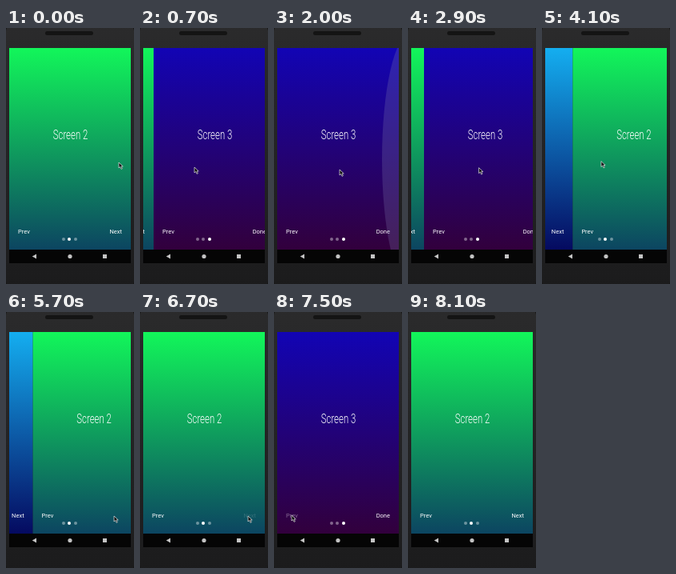
An HTML page for the animation above (8.2 s loop, 160 px wide and 320 px high).

```html
<!DOCTYPE html>
<html lang="en">
<head>
<meta charset="utf-8">
<title>Swiper</title>
<style>
html, body { margin: 0; width: 100%; height: 100%; overflow: hidden; background: #161616; }
#stage { position: relative; width: 160px; height: 320px; overflow: hidden; font: 7.5px Roboto, sans-serif; color: #fff; }
#stage svg { position: absolute; left: 0; top: 0; }
#screen { position: absolute; left: 4px; top: 25px; width: 152px; height: 252px; overflow: hidden; }
#track { display: flex; width: 456px; height: 252px; }
.page { position: relative; width: 152px; height: 252px; }
.page:nth-child(1) { background: linear-gradient(#14aef0, #050a60); }
.page:nth-child(2) { background: linear-gradient(#12f65a, #0c4561); }
.page:nth-child(3) { background: linear-gradient(#1204b4, #32003c); }
h1 { position: absolute; left: 0; top: 98px; width: 153px; margin: 0; text-align: center; font: 300 17px/21px Roboto, sans-serif; transform: scaleX(.67); }
.page span { position: absolute; top: 225px; line-height: 10px; }
.prev { left: 11px; }
.next { right: 11px; }
#dots i { position: absolute; top: 237px; width: 4px; height: 4px; border-radius: 50%; }
</style>
</head>
<body>
<div id="stage">
  <svg width="160" height="320">
    <linearGradient id="body" x2="0" y2="1"><stop stop-color="#2b2b2c"/><stop offset="1" stop-color="#1b1b1c"/></linearGradient>
    <rect x="-.5" y="-12" width="161" height="344" rx="20" fill="url(#body)"/>
    <rect x="49" y="4" width="60" height="5" rx="2.5" fill="#141414"/>
    <rect x="4" y="277" width="152" height="17" fill="#050505"/>
    <path d="M38 282.5v6l-5.3-3z" fill="#c4c4c4"/>
    <circle cx="80" cy="285.5" r="2.6" fill="#c4c4c4"/>
    <rect x="121" y="283" width="5" height="5" fill="#c4c4c4"/>
  </svg>
  <div id="screen">
    <div id="track">
      <div class="page"><h1>Screen 1</h1><span class="next">Next</span></div>
      <div class="page"><h1>Screen 2</h1><span class="prev">Prev</span><span class="next">Next</span></div>
      <div class="page"><h1>Screen 3</h1><span class="prev">Prev</span><span class="next">Done</span></div>
    </div>
    <svg width="152" height="252"><ellipse id="glow" cx="166" cy="139" ry="156" fill="#8080b0"/></svg>
    <div id="dots"><i></i><i></i><i></i></div>
  </div>
  <svg width="160" height="320">
    <path id="cursor" d="M0 0v8.2l2-1.8 1.6 3.4 1.5-.7-1.5-3.3h2.6z" fill="#111" stroke="#eee" stroke-width=".8"/>
  </svg>
</div>
<script>
const LOOP = 8200, WIDTH = 152;
const $ = s => document.querySelector(s);
const buttons = document.querySelectorAll('.page span');
const dots = document.querySelectorAll('#dots i');

// Eased 0 to 1 between two times.
function ease(t, from, to) {
  const u = Math.min(1, Math.max(0, (t - from) / (to - from)));
  return u * u * (3 - 2 * u);
}

// Three swipes, then three button taps.
const pageAt = t => 1
  + ease(t, 250, 800) - ease(t, 2750, 3500) - ease(t, 3910, 4530)
  + ease(t, 5450, 5800) + ease(t, 6780, 7100) - ease(t, 7650, 7980);

// Resting points of the pointer: time, x, y.
const stops = [[0, 141, 168], [700, 68, 174], [1400, 130, 174], [2000, 82, 177],
  [2720, 71, 175], [3200, 126, 174], [3850, 40, 167], [4400, 118, 166],
  [5000, 140, 240], [5300, 135, 255], [6900, 135, 255], [7500, 22, 254], [8000, -12, 262]];

function pointerAt(t) {
  let [, x, y] = stops[0];
  for (let i = 1; i < stops.length; i++) {
    const [from, x0, y0] = stops[i - 1], [to, x1, y1] = stops[i];
    const k = ease(t, from, to);
    x += (x1 - x0) * k;
    y += (y1 - y0) * k;
  }
  return [x, y];
}

// A tapped button fades and returns.
function press(button, t, time) {
  return button.style.opacity = .15 + .85 * ease(Math.abs(t - time), 50, 180);
}

function frame(now) {
  const t = now % LOOP;
  const page = pageAt(t);
  const pull = ease(t, 1650, 2000) - ease(t, 2000, 2500);
  $('#track').style.transform = `translateX(${-WIDTH * page}px)`;
  $('#cursor').setAttribute('transform', `translate(${pointerAt(t)}) scale(.85)`);
  $('#glow').setAttribute('rx', 14 + 21 * pull);
  $('#glow').style.opacity = .25 * pull;
  dots.forEach((dot, i) => {
    dot.style.left = 66 + 7.4 * i + 'px';
    dot.style.background = i === Math.round(page) ? '#fff' : '#fff6';
  });
  press(buttons[0], t, 5400);
  press(buttons[2], t, 6700);
  press(buttons[3], t, 7600);
  requestAnimationFrame(frame);
}
requestAnimationFrame(frame);
</script>
</body>
</html>
```
